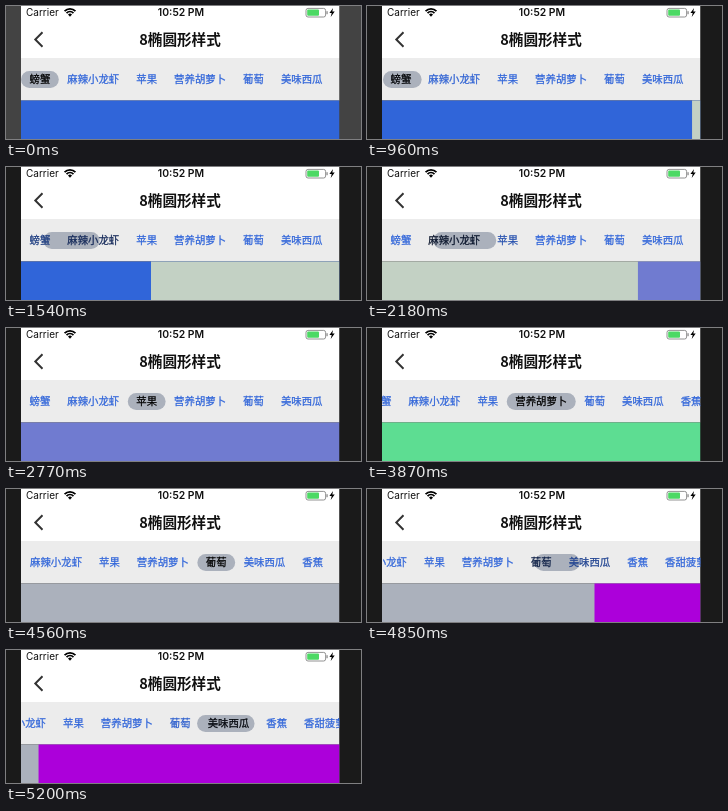
Animation, 355 px wide and 133 px high, one loop 5.26 s. Source, as an HTML page with a canvas:

```html
<!DOCTYPE html>
<html lang="zh-CN">
<head>
<meta charset="utf-8">
<title>8椭圆形样式</title>
<style>
  html, body { margin: 0; width: 100%; height: 100%; overflow: hidden; background: #1a1a1a; }
  canvas { display: block; width: 355px; height: 133px; }
</style>
</head>
<body>
<canvas id="stage"></canvas>
<script>
const W = 355, H = 133, LOOP = 5260;
const LEFT = 15, RIGHT = 333.5, PAGE_W = RIGHT - LEFT, CENTER = (LEFT + RIGHT) / 2;
const CHAR = 10.4, PAD = 8.5, PAGE_TOP = 94.5;
const CJK = '"Noto Sans CJK SC", "Noto Sans CJK", sans-serif';
const LATIN = 'Inter, Roboto, sans-serif';
const PILL = '#abb1bc', BLUE = [48, 101, 217];
const PAGES = ['#3065d9', '#c3d1c4', '#707bd0', '#5ddd92', PILL, '#ac00da'];

let edge = LEFT;
const tabs = ['螃蟹', '麻辣小龙虾', '苹果', '营养胡萝卜', '葡萄', '美味西瓜', '香蕉', '香甜菠萝'].map(label => {
  const left = edge;
  edge += label.length * CHAR + 2 * PAD;
  return { label, left, right: edge };
});

// Each swipe: a drag, a pause, then a decaying settle. Spans are [start, end, steps].
const swipes = [
  { drag: [960, 1310, 7], settle: [1540, 1830, 6], decay: .48 },
  { drag: [2120, 2240, 3], settle: [2470, 2770, 6], decay: .48 },
  { drag: [3000, 3120, 3], settle: [3290, 3810, 10], decay: .45 },
  { drag: [3930, 3990, 2], settle: [4230, 4740, 10], decay: .48 },
  { drag: [4790, 4850, 2], settle: [5030, 5200, 4], decay: .513 }
];
const DRAG_DISTANCE = 106, SETTLE_DISTANCE = 130;

const canvas = document.getElementById('stage');
const ctx = canvas.getContext('2d');
const ratio = window.devicePixelRatio || 1;
canvas.width = W * ratio;
canvas.height = H * ratio;

const mix = (a, b, p) => a + (b - a) * p;
const clamp = v => Math.max(0, Math.min(1, v));
const smooth = v => v * v * (3 - 2 * v);

function stepAt(t, [start, end, count]) {
  if (t < start) return -1;
  return Math.min(count - 1, Math.floor((t - start) / (end - start) * (count - 1) + .25));
}

function scrollTarget(i) {
  return Math.max(0, (tabs[i].left + tabs[i].right) / 2 - CENTER);
}

function stateAt(t) {
  let page = 0, scroll = 0;
  swipes.forEach(({ drag, settle, decay }, i) => {
    const pulled = stepAt(t, drag), settled = stepAt(t, settle);
    if (settled >= 0) {
      const rest = settled >= 5 ? 0 : SETTLE_DISTANCE * decay ** settled;
      page = i + 1 - rest / PAGE_W;
      const p = smooth(clamp((settled - 4.15) / 4.85));
      scroll = mix(scroll, scrollTarget(i + 1), p);
    } else if (pulled >= 0) {
      page = i + DRAG_DISTANCE * ((pulled + 1) / drag[2]) ** 1.3 / PAGE_W;
    }
  });
  return { page, scroll };
}

function rect(x, y, w, h, color) {
  ctx.fillStyle = color;
  ctx.fillRect(x, y, w, h);
}

function rounded(x, y, w, h, r) {
  ctx.beginPath();
  ctx.roundRect(x, y, w, h, r);
}

function text(label, x, y, font, color, align = 'left', weight = 0) {
  ctx.font = font;
  ctx.fillStyle = ctx.strokeStyle = color;
  ctx.textAlign = align;
  ctx.fillText(label, x, y);
  if (weight) {
    ctx.lineWidth = weight;
    ctx.strokeText(label, x, y);
  }
}

function polyline(points) {
  ctx.beginPath();
  points.forEach(([x, y]) => ctx.lineTo(x, y));
}

function drawStatusBar() {
  text('Carrier', 20, 10.3, '400 10px ' + LATIN, '#111');
  text('10:52 PM', 175, 10.3, '600 10.4px ' + LATIN, '#111', 'center');

  ctx.strokeStyle = ctx.fillStyle = '#000';
  ctx.lineWidth = 1.8;
  for (const r of [4.9, 7.7]) {
    ctx.beginPath();
    ctx.arc(64, 10.5, r, -Math.PI * .75, -Math.PI * .25);
    ctx.stroke();
  }
  ctx.beginPath();
  ctx.moveTo(64, 10.7);
  ctx.arc(64, 10.5, 2.8, -Math.PI * .75, -Math.PI * .25);
  ctx.fill();

  ctx.lineWidth = .8;
  ctx.strokeStyle = '#777';
  rounded(300, 2.4, 19.6, 8.6, 2);
  ctx.stroke();
  ctx.fillStyle = '#4cd964';
  rounded(301.2, 3.6, 11.8, 6.2, 1);
  ctx.fill();
  rect(320.5, 5.2, 1.1, 3, '#777');

  ctx.fillStyle = '#000';
  polyline([[327.1, 2], [323.4, 7], [325.7, 7], [324.7, 11], [328.7, 5.6], [326.3, 5.6]]);
  ctx.fill();
}

function drawHeader() {
  rect(LEFT, 0, PAGE_W, 52, '#fff');
  drawStatusBar();
  ctx.strokeStyle = '#333';
  ctx.lineWidth = 2;
  polyline([[36.5, 26.2], [29.3, 33.5], [36.5, 40.8]]);
  ctx.stroke();
  text('8椭圆形样式', 174, 39, '700 14.6px ' + CJK, '#111', 'center');
}

function drawTabs(page, scroll) {
  rect(LEFT, 52, PAGE_W, PAGE_TOP - 52, '#ececec');
  const i = Math.floor(page), p = page - i;
  const from = tabs[i], to = tabs[i + 1];
  const left = mix(from.left, to.left, p) - scroll;
  const right = mix(from.right, to.right, p) - scroll;
  ctx.fillStyle = PILL;
  rounded(left, 65, right - left, 17, 8.5);
  ctx.fill();
  tabs.forEach((tab, n) => {
    const selected = clamp(1 - Math.abs(page - n));
    const color = BLUE.map(c => Math.round(c * (1 - selected)));
    text(tab.label, tab.left + PAD - scroll, 77.3, `500 ${CHAR}px ${CJK}`, `rgb(${color})`, 'left', .25);
  });
}

function drawPages(page) {
  const i = Math.floor(page);
  const border = RIGHT - (page - i) * PAGE_W;
  rect(LEFT, PAGE_TOP, PAGE_W, H - PAGE_TOP, PAGES[i]);
  if (border < RIGHT) rect(border, PAGE_TOP, RIGHT - border, H - PAGE_TOP, PAGES[i + 1]);
}

function draw() {
  const t = performance.now() % LOOP;
  const { page, scroll } = stateAt(t);
  ctx.setTransform(ratio, 0, 0, ratio, 0, 0);
  rect(0, 0, W, H, t < 960 ? '#434343' : '#1a1a1a');
  ctx.save();
  ctx.beginPath();
  ctx.rect(LEFT, 0, PAGE_W, H);
  ctx.clip();
  drawHeader();
  drawTabs(page, scroll);
  drawPages(page);
  ctx.restore();
  requestAnimationFrame(draw);
}
draw();
</script>
</body>
</html>
```
